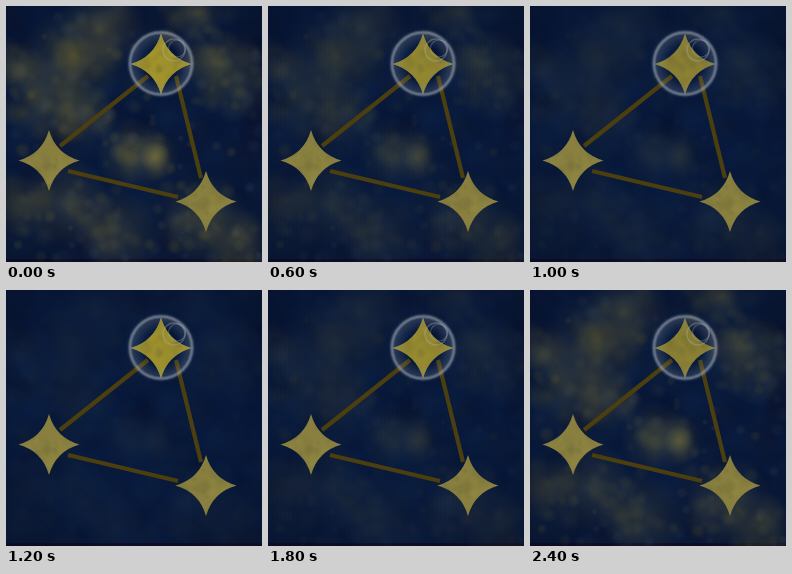
Animation, 256 px wide and 256 px high, one loop 2.6 s. Source, as an HTML page with a canvas:

```html
<!DOCTYPE html>
<html lang="en">
<head>
<meta charset="utf-8">
<title>Star triangle</title>
<style>
html, body { margin: 0; width: 100%; height: 100%; overflow: hidden; background: #07183a; }
canvas { display: block; width: 100vw; height: 100vh; }
</style>
</head>
<body>
<canvas id="sky" width="256" height="256"></canvas>
<script>
const SIZE = 256, STEP = 200, STEPS = 13, DARKEST = 7;
const view = document.getElementById('sky').getContext('2d');

let seed = 41;
const rand = () => (seed = (seed * 16807) % 2147483647) / 2147483647;
const spread = () => rand() + rand() + rand() - 1.5;

function layer(paint) {
  const c = document.createElement('canvas');
  c.width = c.height = SIZE;
  paint(c.getContext('2d'));
  return c;
}

function soft(g, x, y, r, rgb, alpha, core = 0) {
  const fill = g.createRadialGradient(x, y, 0, x, y, r);
  fill.addColorStop(0, `rgba(${rgb},${alpha})`);
  fill.addColorStop(core, `rgba(${rgb},${alpha})`);
  fill.addColorStop(1, `rgba(${rgb},0)`);
  g.fillStyle = fill;
  g.fillRect(x - r, y - r, 2 * r, 2 * r);
}

// Dark, softly mottled night
const night = layer(g => {
  g.fillStyle = '#07193c';
  g.fillRect(0, 0, SIZE, SIZE);
  for (let i = 0; i < 420; i++) {
    const tone = ['12,37,78', '3,13,38', '22,35,54'][i % 3];
    soft(g, rand() * SIZE, rand() * SIZE, 6 + rand() * 18, tone, 0.18);
  }
  const edge = g.createRadialGradient(128, 128, 105, 128, 128, 185);
  edge.addColorStop(0, 'rgba(5,8,25,0)');
  edge.addColorStop(1, 'rgba(5,8,25,.35)');
  g.fillStyle = edge;
  g.fillRect(0, 0, SIZE, SIZE);
  g.fillStyle = 'rgba(14,8,24,.6)';
  g.fillRect(0, 253, SIZE, 3);
});

// Glowing dust clouds: x, y, radius
const clouds = [
  [66, 56, 44], [96, 22, 36], [44, 98, 38], [78, 108, 26], [188, 8, 24],
  [228, 72, 34], [200, 56, 22], [126, 148, 30], [149, 151, 20], [112, 226, 36],
  [196, 212, 38], [62, 196, 36], [232, 236, 28], [12, 62, 22], [14, 200, 26]
];
const dust = layer(g => {
  for (let i = 0; i < 50; i++)
    soft(g, rand() * SIZE, rand() * SIZE, 12 + rand() * 18, '20,13,28', 0.14);
  for (const [x, y, r] of clouds) {
    soft(g, x, y, r * 1.25, '84,82,55', 0.42);
    for (let i = 0; i < r * 0.6; i++) {
      const tone = i % 3 ? '106,98,44' : '84,90,80';
      soft(g, x + spread() * r, y + spread() * r, 5 + rand() * 11, tone, 0.13);
    }
  }
  soft(g, 68, 50, 24, '122,112,42', 0.3);
  soft(g, 149, 151, 16, '142,132,66', 0.55);
  for (let i = 0; i < 110; i++) {
    const tone = ['100,98,60', '66,80,92', '112,102,44'][i % 3];
    soft(g, rand() * SIZE, rand() * SIZE, 3 + rand() * 7, tone, 0.08 + rand() * 0.14, 0.35);
  }
});

function star(g, x, y, r) {
  const b = r * 0.22;
  g.beginPath();
  g.moveTo(x, y - r);
  g.quadraticCurveTo(x + b, y - b, x + r, y);
  g.quadraticCurveTo(x + b, y + b, x, y + r);
  g.quadraticCurveTo(x - b, y + b, x - r, y);
  g.quadraticCurveTo(x - b, y - b, x, y - r);
}

function paintStar(g, x, y, r, colour, light) {
  g.save();
  star(g, x, y, r);
  g.fillStyle = colour;
  g.fill();
  g.clip();
  for (let i = 0; i < 45; i++) {
    const tone = i % 2 ? light : '92,88,46';
    soft(g, x + spread() * r, y + spread() * r, 3 + rand() * 6, tone, 0.2);
  }
  g.restore();
}

const figure = layer(g => {
  g.strokeStyle = '#4b3f10';
  g.lineWidth = 4.2;
  for (const [x1, y1, x2, y2] of [[142, 70, 54, 140], [170, 70, 195, 172], [62, 165, 172, 191]]) {
    g.beginPath();
    g.moveTo(x1, y1);
    g.lineTo(x2, y2);
    g.stroke();
  }
  paintStar(g, 43, 154.5, 30.5, '#89803f', '160,148,76');
  paintStar(g, 200, 195.5, 30.5, '#89803f', '156,146,70');
  paintStar(g, 155, 58, 30.5, '#857b35', '155,142,55');
});

const brightStar = layer(g => paintStar(g, 155, 58, 30.5, '#b0a027', '196,178,44'));

function ring(g, x, y, r, width, alpha, from = 0, to = 2 * Math.PI) {
  g.beginPath();
  g.arc(x, y, r, from, to);
  g.lineWidth = width;
  g.strokeStyle = `rgba(170,178,188,${alpha})`;
  g.stroke();
}

const bubble = layer(g => {
  const glass = g.createRadialGradient(155, 57.5, 18, 155, 57.5, 35);
  glass.addColorStop(0, 'rgba(150,160,175,0)');
  glass.addColorStop(0.75, 'rgba(150,160,175,.26)');
  glass.addColorStop(1, 'rgba(150,160,175,0)');
  g.fillStyle = glass;
  g.fillRect(118, 20, 74, 75);
  ring(g, 155, 57.5, 31, 4, 0.22);
  ring(g, 155, 57.5, 31, 2, 0.28);
  ring(g, 168, 44, 11, 1.4, 0.35);
  ring(g, 171, 42.5, 8.5, 1.2, 0.3);
});

// Shine of the top star at chosen steps
const shine = [[0, 0.65], [3, 0.3], [5, 0.1], [7, 1], [9, 0.4], [10, 0.25], [12, 0.1], [13, 0.65]];
function shineAt(n) {
  const i = shine.findIndex(p => p[0] > n);
  const [a, va] = shine[i - 1], [b, vb] = shine[i];
  return va + (vb - va) * (n - a) / (b - a);
}

function put(image, alpha) {
  view.globalAlpha = alpha;
  view.drawImage(image, 0, 0);
}

function draw(now) {
  const n = Math.floor(now / STEP) % STEPS;
  const glow = n <= DARKEST ? 1 - n / DARKEST : (n - DARKEST) / (STEPS - DARKEST);
  put(night, 1);
  put(dust, glow);
  put(figure, 1);
  put(brightStar, shineAt(n));
  put(bubble, 1);
  requestAnimationFrame(() => draw(performance.now() - start));
}
const start = performance.now();
draw(0);
</script>
</body>
</html>
```
